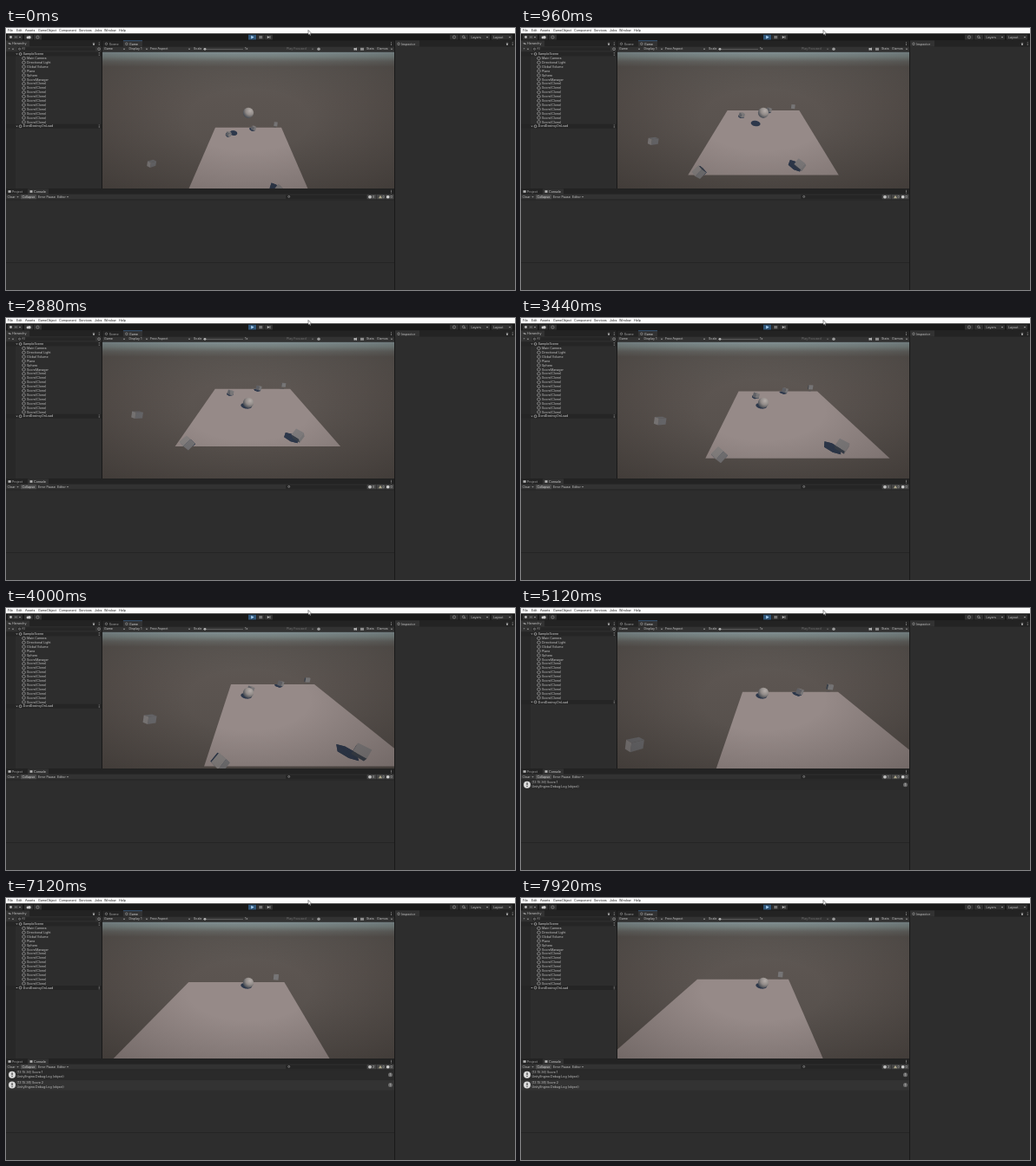
An HTML page with a canvas for the animation above (8000 ms loop, 586 px wide and 302 px high).

```html
<!DOCTYPE html>
<html lang="en">
<head>
<meta charset="utf-8">
<title>Rolling ball in a game editor</title>
<style>
html, body { margin: 0; width: 100%; height: 100%; overflow: hidden; background: #2d2d2d; }
canvas { display: block; width: 586px; height: 302px; }
</style>
</head>
<body>
<canvas id="stage"></canvas>
<script>
const W = 586, H = 302, LOOP = 8000, STEP = 80;
const canvas = document.getElementById('stage');
const ratio = window.devicePixelRatio || 1;
canvas.width = W * ratio;
canvas.height = H * ratio;
const ctx = canvas.getContext('2d');
ctx.scale(ratio, ratio);

// ---------- drawing helpers ----------
function rect(x, y, w, h, color) {
  ctx.fillStyle = color;
  ctx.fillRect(x, y, w, h);
}
function text(s, x, y, color = '#c2c2c2', size = 3.6) {
  ctx.font = size + 'px Inter, Roboto, sans-serif';
  ctx.textBaseline = 'middle';
  ctx.fillStyle = color;
  ctx.fillText(s, x, y);
}
function disc(x, y, r, color) {
  ctx.fillStyle = color;
  ctx.beginPath();
  ctx.arc(x, y, r, 0, 7);
  ctx.fill();
}
function ring(x, y, r, color = '#a8a8a8') {
  ctx.strokeStyle = color;
  ctx.lineWidth = 0.6;
  ctx.beginPath();
  ctx.arc(x, y, r, 0, 7);
  ctx.stroke();
}
function trace(pts) {
  ctx.beginPath();
  pts.forEach(p => ctx.lineTo(p[0], p[1]));
  ctx.closePath();
}
function poly(pts, color) {
  trace(pts);
  ctx.fillStyle = color;
  ctx.fill();
}
function arrow(x, y, color = '#a8a8a8') {
  poly([[x - 1.2, y - 0.6], [x + 1.2, y - 0.6], [x, y + 0.8]], color);
}
function dots(x, y) {
  for (let i = -1; i < 2; i++) rect(x, y - 0.4 + i * 1.4, 0.8, 0.8, '#a8a8a8');
}
function lock(x, y) {
  rect(x - 1, y - 0.2, 2, 1.8, '#a0a0a0');
  ring(x, y - 0.4, 0.8, '#a0a0a0');
}

// ---------- 3D world ----------
const VIEW = { x: 111, y: 27.5, w: 336, h: 157.5 };
const FOCAL = 136.8, MID_X = 279, MID_Y = 106;
const COS = Math.cos(Math.PI / 6), SIN = 0.5;
const SUN = [-0.321, -0.766, 0.557];
const SHADOW = '#2d384b';
let cam = [0, 0, 0];

function project([px, py, pz]) {
  const x = px - cam[0], h = cam[1] - py, z = pz - cam[2];
  const d = z * COS + h * SIN;
  return [MID_X + FOCAL * x / d, MID_Y + FOCAL * (h * COS - z * SIN) / d, d];
}
const toGround = ([x, y, z]) => [x - SUN[0] / SUN[1] * y, 0, z - SUN[2] / SUN[1] * y];

// time, x, z of the ball on the ground
const PATH = [
  [2200, 0, 0], [2880, -0.57, -0.12], [3200, -1.3, 0.33], [4000, -2.92, 1.72],
  [5120, -2.82, 3.81], [5840, -1.62, 4.32], [6320, -0.53, 4.32],
  [6720, 0.48, 4.15], [7600, 2.03, 3.42], [7920, 2.24, 3.13]
];
const DROP = 140, GRAVITY = 8.6;

function slope(i, k) {
  if (i === 0) return 0;
  const a = PATH[i - 1], b = PATH[Math.min(i + 1, PATH.length - 1)];
  return (b[k] - a[k]) / (b[0] - a[0]);
}
function along(t, k) {
  const last = PATH.length - 1;
  if (t <= PATH[0][0]) return PATH[0][k];
  if (t >= PATH[last][0]) return PATH[last][k];
  let i = 0;
  while (t > PATH[i + 1][0]) i++;
  const a = PATH[i], b = PATH[i + 1], span = b[0] - a[0];
  const u = (t - a[0]) / span, u2 = u * u, u3 = u2 * u;
  return (2 * u3 - 3 * u2 + 1) * a[k] + (u3 - 2 * u2 + u) * span * slope(i, k) +
    (3 * u2 - 2 * u3) * b[k] + (u3 - u2) * span * slope(i + 1, k);
}
function ballAt(t) {
  const s = Math.max(0, t - DROP) / 1000;
  return [along(t, 1), Math.max(0.5, 5 - GRAVITY * s * s / 2), along(t, 2)];
}

// position, pitch, yaw and the time of pick-up
const CUBES = [
  { at: [-9.65, 0.3, -1.9], pitch: 0.5, yaw: 0.4 },
  { at: [-4.18, 0.3, -5], pitch: -0.35, yaw: 0.7 },
  { at: [2.47, 0.5, -4.6], pitch: -0.55, yaw: 0.9 },
  { at: [-2.65, 0.3, 3], pitch: 0.4, yaw: 0.9, gone: 4240 },
  { at: [0.75, 0.4, 4.28], pitch: 0.3, yaw: 0.8, gone: 6560 },
  { at: [4.12, 0.48, 5.22], pitch: 0.2, yaw: 0.2 }
];
const SIDE = 0.25;
const FACES = [];
for (let axis = 0; axis < 3; axis++) {
  for (const sign of [-1, 1]) {
    const normal = [0, 0, 0];
    normal[axis] = sign;
    const corners = [[-1, -1], [1, -1], [1, 1], [-1, 1]].map(([u, v]) => {
      const p = [0, 0, 0];
      p[axis] = sign;
      p[(axis + 1) % 3] = u;
      p[(axis + 2) % 3] = v;
      return p;
    });
    FACES.push({ normal, corners });
  }
}
function turn([x, y, z], { pitch, yaw }) {
  const y1 = y * Math.cos(pitch) - z * Math.sin(pitch);
  const z1 = y * Math.sin(pitch) + z * Math.cos(pitch);
  return [x * Math.cos(yaw) + z1 * Math.sin(yaw), y1, z1 * Math.cos(yaw) - x * Math.sin(yaw)];
}
const dot = (a, b) => a[0] * b[0] + a[1] * b[1] + a[2] * b[2];

function cubeFaces(cube) {
  return FACES.map(f => ({
    normal: turn(f.normal, cube),
    corners: f.corners.map(c => turn(c, cube).map((v, i) => cube.at[i] + v * SIDE))
  }));
}
function drawCube(cube) {
  for (const { normal, corners } of cubeFaces(cube)) {
    const toCam = corners[0].map((v, i) => cam[i] - v);
    if (dot(normal, toCam) <= 0) continue;
    const l = Math.max(0, -dot(normal, SUN));
    const color = [56 + 100 * l, 63 + 86 * l, 73 + 72 * l].map(Math.round);
    poly(corners.map(project), `rgb(${color})`);
  }
}
function drawBallShadow(ball) {
  const [cx, , cz] = toGround(ball);
  const flat = Math.hypot(SUN[0], SUN[2]);
  const ax = SUN[0] / flat, az = SUN[2] / flat, long = 0.5 / -SUN[1];
  const pts = [];
  for (let i = 0; i < 32; i++) {
    const a = i / 16 * Math.PI, u = long * Math.cos(a), v = 0.5 * Math.sin(a);
    pts.push(project([cx + ax * u - az * v, 0, cz + az * u + ax * v]));
  }
  poly(pts, SHADOW);
}
function drawBall(ball) {
  const [x, y, d] = project(ball), r = FOCAL * 0.5 / d;
  const hx = x + r * 0.32, hy = y - r * 0.39;
  const g = ctx.createRadialGradient(hx, hy, 0, hx, hy, r * 1.55);
  g.addColorStop(0, '#b4ada9');
  g.addColorStop(0.5, '#918b88');
  g.addColorStop(0.8, '#5c5d61');
  g.addColorStop(1, '#3b424d');
  disc(x, y, r, g);
}
function drawWorld(t) {
  const ball = ballAt(t);
  cam = [ball[0], ball[1] + 5, ball[2] - 10];
  const cubes = CUBES.filter(c => !c.gone || t < c.gone);

  ctx.save();
  ctx.beginPath();
  ctx.rect(VIEW.x, VIEW.y, VIEW.w, VIEW.h);
  ctx.clip();

  const sky = ctx.createLinearGradient(0, VIEW.y, 0, VIEW.y + VIEW.h);
  [[0, '#93a5a9'], [0.035, '#84908f'], [0.07, '#6b6c69'], [0.11, '#5e5955'],
   [0.35, '#5c5551'], [1, '#534d49']].forEach(s => sky.addColorStop(...s));
  rect(VIEW.x, VIEW.y, VIEW.w, VIEW.h, sky);

  const floor = [[-5, 5], [5, 5], [5, -5], [-5, -5]].map(([x, z]) => project([x, 0, z]));
  poly(floor, '#968a88');

  ctx.save();
  trace(floor);
  ctx.clip();
  for (const c of cubes)
    for (const f of cubeFaces(c)) poly(f.corners.map(p => project(toGround(p))), SHADOW);
  drawBallShadow(ball);
  ctx.restore();

  const things = cubes.map(c => ({ depth: project(c.at)[2], draw: () => drawCube(c) }));
  things.push({ depth: project(ball)[2], draw: () => drawBall(ball) });
  things.sort((a, b) => b.depth - a.depth).forEach(o => o.draw());

  // vignette
  ctx.translate(MID_X, MID_Y);
  ctx.scale(1, 0.5);
  const v = ctx.createRadialGradient(0, 0, 70, 0, 0, 235);
  v.addColorStop(0, 'rgba(20,16,14,0)');
  v.addColorStop(1, 'rgba(20,16,14,0.28)');
  rect(-168, -160, 336, 320, v);
  ctx.restore();
}

// ---------- editor ----------
const PANEL = '#2d2d2d', BAR = '#323232', STRIP = '#232323', EDGE = '#191919';

function drawMenu() {
  rect(0, 0, W, 6.5, '#fbfbfb');
  [['File', 2], ['Edit', 12], ['Assets', 22], ['GameObject', 37], ['Component', 61],
   ['Services', 84], ['Jobs', 102], ['Window', 113], ['Help', 130]]
    .forEach(([s, x]) => text(s, x, 3.2, '#222'));

  rect(0, 6.5, W, 8, EDGE);
  [[2, 17], [21, 10], [32, 9], [511, 10], [522, 10], [533, 24], [559, 24]]
    .forEach(([x, w]) => rect(x, 7.7, w, 5.8, '#303030'));
  disc(5.5, 10.5, 1.4, '#bbb');
  text('H', 10, 10.7);
  arrow(16, 10.6);
  disc(25, 11, 1.4, '#c8c8c8');
  disc(27, 10.7, 1.7, '#c8c8c8');
  ring(36.5, 10.6, 1.6);
  rect(279, 7.7, 9, 5.8, '#2f5578');
  rect(288.5, 7.7, 9, 5.8, '#303030');
  rect(298, 7.7, 9, 5.8, '#303030');
  poly([[282.2, 8.8], [285.6, 10.6], [282.2, 12.4]], '#a9d2f5');
  rect(291.8, 9, 0.9, 3.2, '#bbb');
  rect(293.7, 9, 0.9, 3.2, '#bbb');
  poly([[300.8, 9], [303.4, 10.6], [300.8, 12.2]], '#bbb');
  rect(303.6, 9, 0.7, 3.2, '#bbb');
  ring(516, 10.5, 1.6);
  ring(526.7, 10.2, 1.3);
  rect(527.6, 11.2, 1.2, 0.8, '#a8a8a8');
  text('Layers', 535.5, 10.7);
  arrow(554, 10.6);
  text('Layout', 561, 10.7);
  arrow(580, 10.6);
}

function drawHierarchy(clones) {
  rect(0, 14.5, 110, 170.5, PANEL);
  rect(0, 14.5, 110, 7, STRIP);
  rect(0, 14.5, 27, 7, BAR);
  rect(2.5, 17, 2.6, 0.6, '#bbb');
  rect(3.3, 18.4, 2.6, 0.6, '#bbb');
  text('Hierarchy', 7, 18.4);
  lock(101, 18.2);
  dots(106.8, 18.2);
  rect(0, 21.5, 110, 5.8, BAR);
  text('+', 2.5, 24.2);
  arrow(8, 24.4);
  rect(13, 22.2, 90, 4.3, '#262626');
  text('All', 18, 24.4, '#8a8a8a');
  ring(15.5, 24.2, 1);
  ring(107, 24.2, 1.4);
  rect(0, 27.3, 11, 157.7, '#282828');

  const names = ['Main Camera', 'Directional Light', 'Global Volume', 'Plane', 'Sphere', 'ScoreManager'];
  for (let i = 0; i < clones; i++) names.push('Score(Clone)');
  const gap = 4.9, top = 30;
  const scene = (s, y) => {
    rect(0, y - 2.4, 110, 4.8, '#252525');
    arrow(12.5, y);
    ring(16.6, y, 1.4, '#d0d0d0');
    text(s, 19.8, y + 0.1, '#d2d2d2');
    dots(106.8, y);
  };
  scene('SampleScene', top);
  names.forEach((s, i) => {
    const y = top + gap * (i + 1);
    ctx.strokeStyle = '#b4b4b4';
    ctx.lineWidth = 0.6;
    trace([[20.5, y - 1.8], [22.2, y - 0.9], [22.2, y + 0.9], [20.5, y + 1.8], [18.8, y + 0.9], [18.8, y - 0.9]]);
    ctx.stroke();
    text(s, 24, y + 0.1);
  });
  scene('DontDestroyOnLoad', top + gap * (names.length + 1));
}

function drawGameBars() {
  rect(111, 14.5, 336, 7, STRIP);
  rect(135, 14.5, 22, 7, BAR);
  rect(135, 14.5, 22, 0.6, '#3a6ea5');
  ring(115.5, 18.3, 1.2);
  text('Scene', 118.8, 18.5, '#a8a8a8');
  ring(138.8, 18.3, 1.3);
  text('Game', 142, 18.5, '#d6d6d6');
  dots(443, 18.2);
  rect(111, 21.5, 336, 6, BAR);
  [['Game', 113, 136], ['Display 1', 141.5, 162], ['Free Aspect', 166, 211]].forEach(([s, x, a]) => {
    text(s, x, 24.4);
    arrow(a, 24.4);
  });
  text('Scale', 216, 24.4);
  rect(227, 24, 46, 0.7, '#6a6a6a');
  disc(229, 24.3, 1.4, '#b5b5b5');
  text('1x', 275, 24.4);
  text('Play Focused', 323, 24.4, '#707070');
  arrow(353, 24.4, '#707070');
  disc(360, 24.3, 1.8, '#9a9a9a');
  rect(400.5, 23, 2.2, 2.6, '#b5b5b5');
  poly([[402, 24.3], [404, 22.3], [404, 26.3]], '#b5b5b5');
  rect(408, 22.8, 4, 3, '#8e8e8e');
  text('Stats', 415, 24.4);
  text('Gizmos', 427, 24.4);
  arrow(444, 24.4);
}

function drawInspector() {
  rect(448, 14.5, 138, 287.5, PANEL);
  rect(448, 14.5, 138, 7, STRIP);
  rect(448, 14.5, 28, 7, BAR);
  ring(452, 18.3, 1.3);
  text('Inspector', 455, 18.5);
  lock(577, 18.2);
  dots(582.8, 18.2);
}

function infoIcon(x, y, r) {
  disc(x, y, r, '#dcdcdc');
  rect(x - r * 0.13, y - r * 0.6, r * 0.28, r * 0.7, '#333');
  rect(x - r * 0.13, y + r * 0.3, r * 0.28, r * 0.28, '#333');
}

function drawConsole(logs) {
  rect(0, 185.5, 447, 116.5, PANEL);
  rect(0, 185.5, 447, 6.2, STRIP);
  rect(25, 185.5, 24, 6.2, BAR);
  rect(2.5, 187.2, 3.2, 2.6, '#b5b5b5');
  text('Project', 7, 188.8, '#a8a8a8');
  rect(27.5, 187.2, 3, 2.6, '#b5b5b5');
  text('Console', 32, 188.8, '#d6d6d6');
  dots(443, 188.6);

  rect(0, 191.7, 447, 6, BAR);
  text('Clear', 1.5, 194.8);
  arrow(13.5, 194.8);
  rect(17, 192, 18, 5.4, '#4a4a4a');
  text('Collapse', 18.5, 194.8, '#d6d6d6');
  text('Error Pause', 37, 194.8);
  text('Editor', 59, 194.8);
  arrow(71, 194.8);
  rect(322, 192.4, 93, 4.5, '#252525');
  ring(325.7, 194.4, 1);
  [[416, 10], [427, 9], [437, 9]].forEach(([x, w]) => rect(x, 192, w, 5.4, '#464646'));
  infoIcon(419, 194.7, 1.8);
  text(String(logs), 422, 194.9);
  poly([[429, 196.2], [431, 192.8], [433, 196.2]], '#b0a98c');
  text('0', 433.6, 194.9);
  disc(439.7, 194.7, 1.8, '#d0d0d0');
  text('0', 442.5, 194.9);
  rect(0, 197.7, 447, 0.5, EDGE);

  const stamps = ['[13:15:36] Score 1', '[13:15:38] Score 2'];
  for (let i = 0; i < logs; i++) {
    const y = 198.2 + i * 11.9;
    rect(0, y, 447, 11.6, i ? '#333333' : '#2a2a2a');
    infoIcon(7, y + 5.5, 4);
    text(stamps[i], 12.5, y + 3);
    text('UnityEngine.Debug:Log (object)', 12.5, y + 7.7);
    disc(442.5, y + 5.5, 2.5, '#6c6c6c');
    text('1', 441.8, y + 5.7, '#ddd', 3.2);
  }
  rect(0, 270, 447, 0.7, '#202020');
}

function drawCursor() {
  trace([[348, 2.5], [348, 8], [349.3, 6.9], [350.2, 8.7], [351, 8.3], [350.2, 6.6], [351.8, 6.4]]);
  ctx.fillStyle = '#fff';
  ctx.fill();
  ctx.strokeStyle = '#222';
  ctx.lineWidth = 0.5;
  ctx.stroke();
}

function frame() {
  const t = Math.floor(performance.now() % LOOP / STEP) * STEP;
  const score = CUBES.filter(c => c.gone && t >= c.gone).length;
  rect(0, 0, W, H, EDGE);
  drawMenu();
  drawHierarchy(10 - score);
  drawGameBars();
  drawWorld(t);
  drawInspector();
  drawConsole(score);
  drawCursor();
  requestAnimationFrame(frame);
}
frame();
</script>
</body>
</html>
```
